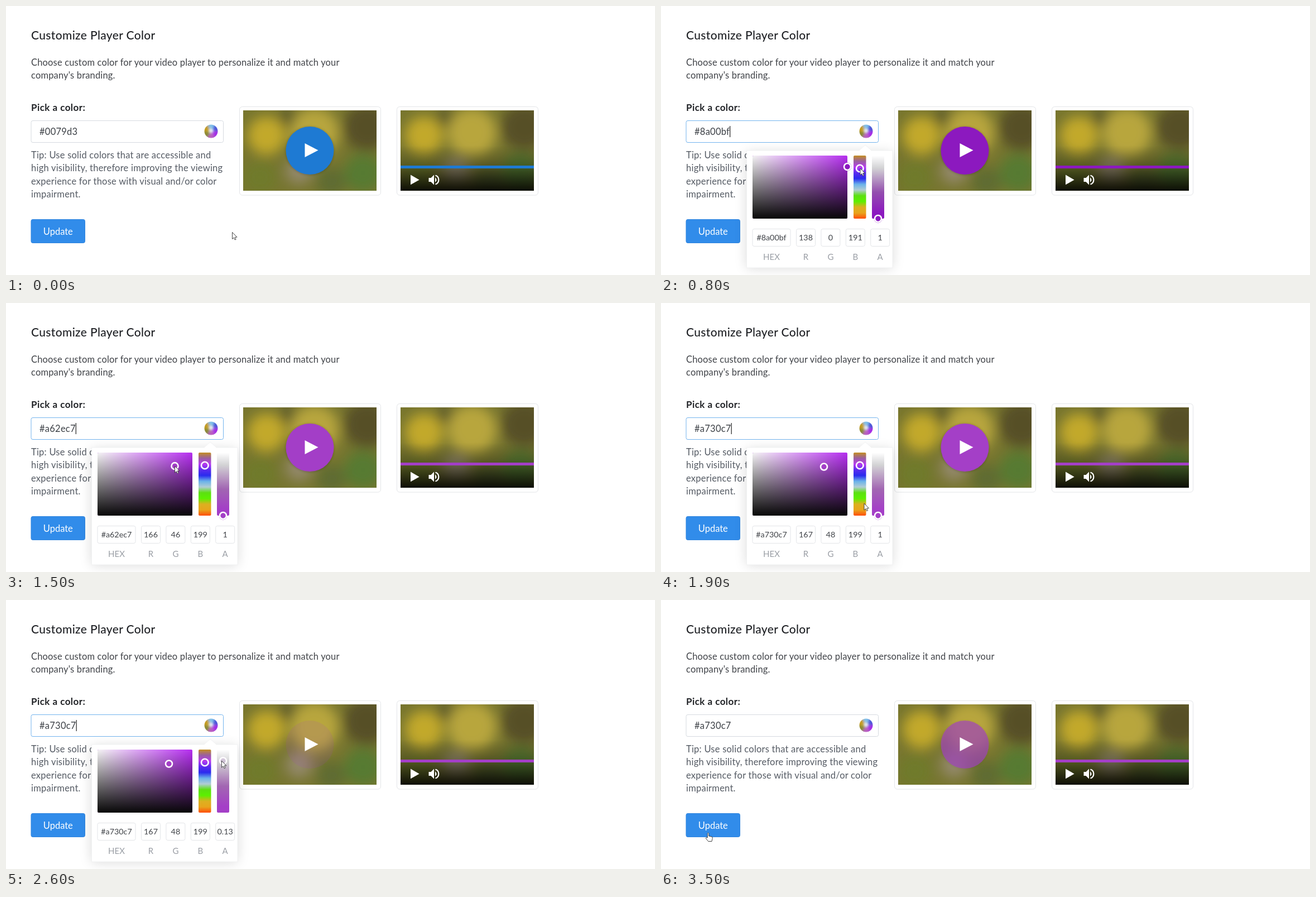
Write an HTML page that moves like this. It is 1163 px wide and 482 px high and loops after 3700 ms.

```html
<!DOCTYPE html>
<html lang="en">
<head>
<meta charset="utf-8">
<title>Customize Player Color</title>
<style>
html, body { margin: 0; width: 100%; height: 100%; overflow: hidden; background: #fff; }
svg { display: block; width: 100%; height: 100%; font: 16.5px Lato, "Open Sans", sans-serif; }
.title { font-size: 21px; font-weight: 500; letter-spacing: .35px; fill: #202226; }
.lead { letter-spacing: .16px; fill: #404348; }
.label { font-size: 17px; font-weight: 700; letter-spacing: .45px; fill: #202226; }
.tip { letter-spacing: .23px; fill: #555b64; }
.field { letter-spacing: .25px; fill: #3c4046; }
.value { font-size: 14.3px; text-anchor: middle; fill: #3f4247; }
.name { font-size: 15px; text-anchor: middle; fill: #9a9ea5; }
.ring { fill: none; stroke: #fff; stroke-width: 2.6; }
</style>
</head>
<body>
<svg viewBox="0 0 1163 482" xmlns="http://www.w3.org/2000/svg">
  <defs>
    <filter id="blur" x="-50%" y="-50%" width="200%" height="200%"><feGaussianBlur stdDeviation="11"/></filter>
    <filter id="soft" x="-50%" y="-50%" width="200%" height="200%"><feGaussianBlur stdDeviation="2"/></filter>
    <clipPath id="screen"><path d="M0 0H239V144H0Z"/></clipPath>
    <clipPath id="disc"><circle r="12"/></clipPath>
    <linearGradient id="white"><stop stop-color="#f4f4f4"/><stop offset="1" stop-color="#fff" stop-opacity="0"/></linearGradient>
    <linearGradient id="black" x2="0" y2="1"><stop stop-opacity="0"/><stop offset="1" stop-color="#080808"/></linearGradient>
    <linearGradient id="shade" x2="0" y2="1"><stop stop-opacity="0"/><stop offset=".45" stop-opacity=".25"/><stop offset="1" stop-opacity=".88"/></linearGradient>
    <linearGradient id="hues" x2="0" y2="1"></linearGradient>
    <linearGradient id="fade" x2="0" y2="1"><stop stop-color="#fff"/><stop offset=".2" stop-color="#d2d2d4"/><stop id="fadeMid" offset=".58"/><stop id="fadeEnd" offset=".9"/></linearGradient>
    <g id="photo" clip-path="url(#screen)">
      <path fill="#77752f" d="M0 0H239V144H0Z"/>
      <g id="bokeh" filter="url(#blur)"></g>
    </g>
    <path id="play" fill="#fff" d="M0 0L24 12.5L0 25Z"/>
  </defs>

  <text class="title" x="45" y="60">Customize Player Color</text>
  <text class="lead" x="45" y="107">Choose custom color for your video player to personalize it and match your</text>
  <text class="lead" x="45" y="130">company's branding.</text>
  <text class="label" x="45" y="187.5">Pick a color:</text>

  <rect id="input" x="45" y="205.5" width="344.5" height="39" rx="3" fill="#fff"/>
  <text id="hex" class="field" x="60" y="230.5"></text>
  <path id="caret" stroke="#222" stroke-width="1.2"/>
  <g transform="translate(367.5 224.5)" clip-path="url(#disc)">
    <g id="wheel" filter="url(#soft)"></g>
    <circle cy="-1" r="4" fill="#edf3f6" filter="url(#soft)"/>
  </g>

  <text class="tip" x="45" y="273">Tip: Use solid colors that are accessible and</text>
  <text class="tip" x="45" y="296">high visibility, therefore improving the viewing</text>
  <text class="tip" x="45" y="319.5">experience for those with visual and/or color</text>
  <text class="tip" x="45" y="343">impairment.</text>

  <rect x="45" y="382.5" width="96.5" height="42" rx="3" fill="#318cea" stroke="#2f84de"/>
  <text x="93.3" y="409.5" text-anchor="middle" fill="#fff">Update</text>

  <g fill="#fff" stroke="#e3e5e8">
    <rect x="418.5" y="180.5" width="253" height="158.5" rx="5"/>
    <rect x="700.5" y="180.5" width="253" height="158.5" rx="5"/>
  </g>
  <use href="#photo" x="425" y="187"/>
  <circle id="bigShade" cx="544.5" cy="259.5" r="43.5" filter="url(#soft)"/>
  <circle id="big" cx="544.5" cy="259" r="43"/>
  <use href="#play" x="535.5" y="246"/>

  <use href="#photo" x="707" y="187"/>
  <path fill="url(#shade)" d="M707 250H946V331H707Z"/>
  <path id="bar" d="M707 286H946V291H707Z"/>
  <use href="#play" transform="translate(725 302.5) scale(.65 .71)"/>
  <g fill="#fff">
    <path d="M757.5 308H761.5L767 302.5V320.5L761.5 315H757.5Z"/>
    <path d="M769 307Q774 311.5 769 316Z"/>
    <path d="M769.5 303.5A8.4 8.4 0 0 1 769.5 319.5" fill="none" stroke="#fff" stroke-width="2.2"/>
  </g>

  <g id="picker">
    <rect x="153" y="262" width="262" height="208" rx="4" opacity=".14" filter="url(#blur)"/>
    <path fill="#fff" stroke="#eceef0" stroke-width=".7" d="M153.5 259H355L366 249L377 259H415V469H153.5Z"/>
    <rect id="tint" x="164" y="268" width="170" height="113" rx="2"/>
    <rect x="164" y="268" width="170" height="113" rx="2" fill="url(#white)"/>
    <rect x="164" y="268" width="170" height="113" rx="2" fill="url(#black)"/>
    <rect x="345" y="268" width="22.5" height="113" rx="2" fill="url(#hues)"/>
    <rect x="378" y="268" width="22" height="113" rx="2" fill="url(#fade)"/>
    <g id="areaKnob"><circle class="dot" r="7.4"/><circle class="ring" r="6"/></g>
    <g id="hueKnob"><circle class="ring" r="6.3"/></g>
    <g id="alphaKnob"><circle class="dot" r="7.4"/><circle class="ring" r="6"/></g>
    <g id="boxes"></g>
  </g>

  <path id="arrow" fill="#fff" stroke="#333" stroke-width=".9" stroke-linejoin="round" d="M0 0V12L2.8 9.5L4.7 13.5L6.6 12.6L4.8 8.7H8.5Z"/>
  <path id="hand" fill="#fff" stroke="#333" stroke-width=".9" stroke-linejoin="round" d="M-1.2 9V1Q0-1 1.2 1V6L6.5 7.2Q8 7.7 7.8 9.5L6.5 15.5H.2L-4.3 9.8Q-4 7.6-1.2 9Z"/>
</svg>
<script>
const LOOP = 3700, STEP = 100;
const $ = id => document.getElementById(id);
const set = (node, attrs) => { for (const k in attrs) node.setAttribute(k, attrs[k]); return node; };
const add = (parent, tag, attrs, text = "") => {
  const node = set(document.createElementNS("http://www.w3.org/2000/svg", tag), attrs);
  node.textContent = text;
  return parent.appendChild(node);
};
const clamp = (v, lo, hi) => Math.min(hi, Math.max(lo, v));
const ramp = (t, from, to) => clamp((t - from) / (to - from), 0, 1);
const mix = (a, b, p) => a.map((v, i) => v + (b[i] - v) * p);
const css = rgb => `rgb(${rgb.map(Math.round)})`;
const move = (id, [x, y]) => set($(id), { transform: `translate(${x} ${y})` });
const show = (id, on) => set($(id), { visibility: on ? "visible" : "hidden" });

// Blurred photo: centre, radius and colour of each spot
[[42, 45, 34, "#c2a92a"], [82, 14, 16, "#55552a"], [128, 40, 44, "#b8a63e"], [222, 30, 42, "#575026"],
 [215, 112, 34, "#567a30"], [100, 108, 24, "#93886a"], [30, 120, 30, "#6f7a2c"], [158, 128, 26, "#5f6c30"]]
  .forEach(([cx, cy, r, fill]) => add($("bokeh"), "circle", { cx, cy, r, fill }));

["#7fc0ea", "#4a55d8", "#a52ce6", "#b95fc0", "#8a8a30", "#c59b1e"].forEach((fill, i) =>
  add($("wheel"), "path", { fill, d: "M0 0L-9-15H9Z", transform: `rotate(${i * 60})` }));

["#c48f22", "#9a5fa0", "#b73cf0", "#5a2cee", "#2a2aee", "#6ab2ea",
 "#b0ccd4", "#5ce010", "#5cf000", "#dcb020", "#e8a51c", "#ff4d08"].forEach((color, i, all) =>
  add($("hues"), "stop", { offset: i / (all.length - 1), "stop-color": color }));

const values = ["HEX", "R", "G", "B", "A"].map((name, i) => {
  const x = i ? 198.1 + 44.4 * i : 164, width = i ? 34 : 68, mid = x + width / 2;
  add($("boxes"), "rect", { x, y: 399.5, width, height: 31, rx: 3, fill: "#fff", stroke: "#e3e5e8" });
  add($("boxes"), "text", { class: "name", x: mid, y: 454.5 }, name);
  return add($("boxes"), "text", { class: "value", x: mid, y: 419.5 });
});

// Stops of the pointer: time, x, y
const stops = [[0, 405.5, 405.5], [300, 367, 226], [500, 341.5, 303], [800, 357, 291], [1200, 334, 288],
  [1600, 292, 293.5], [2000, 388, 381], [2300, 388, 273], [2500, 388, 273], [3000, 389, 349], [3400, 84.5, 417]];

function pointer(t) {
  const i = stops.findIndex(s => s[0] > t);
  if (i < 0) return stops[stops.length - 1].slice(1);
  const [from, ...a] = stops[i - 1], [to, ...b] = stops[i];
  return mix(a, b, ramp(t, from, to));
}

const BLUE = [0, 121, 211], PURPLE = [138, 0, 191], ORCHID = [167, 48, 199];

function draw(t) {
  // three drags: hue bar, shade area, alpha bar
  const hue = ramp(t, 500, 800), shade = ramp(t, 1200, 1510);
  const alpha = 1 - ramp(t, 2000, 2300) + .65 * ramp(t, 2500, 3000);
  const rgb = mix(mix(BLUE, PURPLE, hue), ORCHID, shade).map(Math.round);
  const hex = "#" + rgb.map(v => v.toString(16).padStart(2, "0")).join("");
  const [r, g, b] = rgb;
  const fill = css([r * .8 + 30, g * .8 + 25, b]);
  const open = t >= 400 && t < 3300, focus = t >= 300 && t < 3300;

  $("hex").textContent = hex;
  set($("caret"), { d: `M${60.5 + $("hex").getComputedTextLength()} 215V235` });
  show("caret", open && hue > .5 && (t < 2000 || t >= 2200));
  set($("input"), { stroke: focus ? "#74b4ee" : "#d6dae0" });

  set($("big"), { fill, "fill-opacity": alpha });
  set($("bigShade"), { opacity: .2 * ramp(alpha, .5, 1) });
  set($("bar"), { fill });

  show("picker", open);
  set($("tint"), { fill: css(mix([24, 126, 224], [182, 46, 240], hue)) });
  set($("fadeMid"), { "stop-color": css(rgb.map(v => v * .5 + 78)) });
  set($("fadeEnd"), { "stop-color": fill });
  move("areaKnob", pointer(clamp(t, 1200, 1600)));
  move("hueKnob", mix([356.3, 322], [356.3, 291], hue));
  move("alphaKnob", [389, pointer(clamp(t, 2000, 3000))[1]]);
  document.querySelectorAll(".dot").forEach(dot => set(dot, { fill }));
  set($("alphaKnob").firstElementChild, { "fill-opacity": alpha });
  [hex, ...rgb, +alpha.toFixed(2)].forEach((v, i) => values[i].textContent = v);

  const spot = pointer(t), hand = spot[0] < 142;
  move("arrow", hand ? spot : [spot[0] - 9 * ramp(t, 2500, 3000), spot[1]]);
  move("hand", spot);
  show("arrow", !hand);
  show("hand", hand);
}

function tick() {
  draw(Math.floor(performance.now() % LOOP / STEP) * STEP);
  requestAnimationFrame(tick);
}
tick();
</script>
</body>
</html>
```
